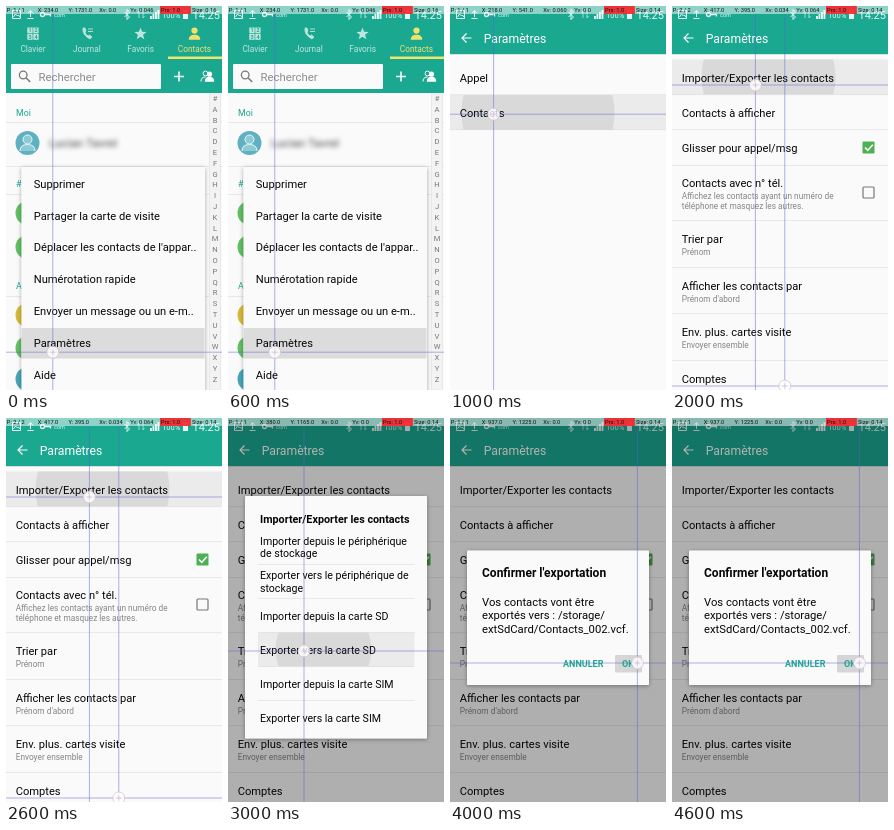
Animation of 216x384 px, one loop 5000 ms. Source, as an HTML page:

```html
<!DOCTYPE html>
<html lang="fr">
<head>
<meta charset="utf-8">
<title>Export des contacts</title>
<style>
html, body { margin: 0; width: 100%; height: 100%; overflow: hidden; background: #fafafa; }
svg { display: block; width: 100vw; height: 100vh; font-family: Roboto, "Noto Sans", sans-serif; }
</style>
</head>
<body>
<svg id="stage" viewBox="0 0 216 384"></svg>
<script>
const TEAL = '#1ba891', INK = '#060606', MUTED = '#858585', PAPER = '#fafafa';
const stage = document.getElementById('stage');

const rect = (x, y, w, h, fill, extra = '') =>
  `<rect x="${x}" y="${y}" width="${w}" height="${h}" fill="${fill}" ${extra}/>`;
const circle = (x, y, r, fill, extra = '') =>
  `<circle cx="${x}" cy="${y}" r="${r}" fill="${fill}" ${extra}/>`;
const path = (d, stroke = '#fff', width = 1, fill = 'none') =>
  `<path d="${d}" fill="${fill}" stroke="${stroke}" stroke-width="${width}"/>`;
const text = (x, y, value, size = 11.15, fill = INK, extra = '') =>
  `<text x="${x}" y="${y}" font-size="${size}" fill="${fill}" ${extra}>${value}</text>`;
const centered = 'text-anchor="middle"';
const bold = 'font-weight="700"';
const divider = (y, x = 0, width = 216) => rect(x, y, width, 0.6, '#dcdcdc');

// Touch ripple: a disc cut off by the row it spreads in.
function ripple(x, y, r, top, bottom, fill = '#d9d9d9') {
  const half = edge => Math.sqrt(r * r - (edge - y) ** 2);
  const a = half(top), b = half(bottom);
  return `<path fill="${fill}" d="M${x - a} ${top}H${x + a}A${r} ${r} 0 0 1 ${x + b} ${bottom}H${x - b}A${r} ${r} 0 0 1 ${x - a} ${top}Z"/>`;
}

function statusBar() {
  const bars = [0, 1, 2, 3].map(i => rect(144 + i * 2.5, 10 - i * 2, 1.9, 3 + i * 2, '#fff')).join('');
  return rect(0, 0, 216, 15, TEAL) + `<g opacity=".9">` +
    path('M6.5 4.5h8v8h-8zM7.5 11l2-3 2 2 1-1 1.5 2') +
    path('M24.5 11V5M22 7.5l2.5-3 2.5 3M21.5 12.5h6') +
    circle(36.5, 8.5, 2, 'none', 'stroke="#fff" stroke-width="1.3"') + path('M38.5 8.5h6v2', '#fff', 1.3) +
    text(48, 11, 'com', 5.5, '#fff') +
    path('M118.5 6l5 5-2.5 2.5V3.5l2.5 2.5-5 5') +
    path('M133 12V5m-1.5 2l1.5-2M137 5v7m1.5-2l-1.5 2', '#d6eee9', .8) +
    bars + text(156, 11.5, '100%', 7.5, '#fff') +
    rect(177, 4, 5, 9, '#fff') + text(186.5, 12.5, '14:25', 11, '#fff') + '</g>';
}

function header() {
  return rect(0, 0, 216, 48, TEAL) + statusBar() + rect(0, 48, 216, .7, '#c7d8d5') +
    path('M21.5 32h-9M16.5 27.5L12 32l4.5 4.5', '#fff', 1.2) +
    text(33.7, 36.5, 'Paramètres', 12.2, '#fff');
}

const person = (x, y, fill, s = 1) =>
  circle(x, y - 3 * s, 2.7 * s, fill) +
  `<path fill="${fill}" d="M${x - 5 * s} ${y + 5 * s}q0-5 ${5 * s}-5t${5 * s} 5z"/>`;

function contactsScreen() {
  const yellow = '#f0e36b', pale = '#bfe6de';
  let out = rect(0, 0, 216, 384, PAPER) + rect(0, 0, 216, 87, TEAL) + statusBar();
  for (let i = 0; i < 4; i++) {
    const x = 21.3 + (i % 2) * 6, y = 21.5 + (i > 1) * 6.5;
    out += rect(x, y, 5.3, 5.8, pale) + text(x + 2.65, y + 4.9, i + 1, 5.4, TEAL, centered + ' ' + bold);
  }
  out += path('M77 22q-1 7 7 11l2-2-2.5-2-1.5 1q-3-2-3-4l1-1-1-3z', pale, .8, pale) +
    path('M82 23h5M82 25.5h5', pale, .9);
  const star = Array.from({ length: 10 }, (_, i) => {
    const r = i % 2 ? 2.7 : 6.5, a = i * Math.PI / 5;
    return `${134.5 + r * Math.sin(a)},${28 - r * Math.cos(a)}`;
  }).join(' ');
  out += `<polygon points="${star}" fill="${pale}"/>` + person(188.5, 28, yellow, 1.15);
  ['Clavier', 'Journal', 'Favoris', 'Contacts'].forEach((tab, i) => {
    out += text(27 + i * 53.8, 45.5, tab, 8.3, i === 3 ? yellow : pale, centered);
  });
  out += rect(162, 50.5, 54, 2.5, '#eee66b') +
    rect(5, 58, 150, 25, PAPER, 'rx="1"') +
    circle(17.2, 69, 3.8, 'none', 'stroke="#777" stroke-width="1.3"') + path('M20.2 72l4 4', '#777', 1.5) +
    text(32.5, 74.5, 'Rechercher', 11.4, '#8c8c8c') +
    path('M168 70.5h10M173 65.5v10', '#fff', 1.5) +
    circle(199.5, 67.5, 2.4, 'none', 'stroke="#fff"') + path('M195 75.5q0-4.5 4.5-4.5') +
    person(203.5, 71, '#fff', .95);

  out += text(10, 110, 'Moi', 8.8, TEAL) + divider(116) +
    circle(21.5, 137, 12, '#5fb1c2') + circle(21.5, 133.5, 4.5, '#8ccad6', 'stroke="#e9f7fa"') +
    path('M14 145q0-6.5 7.5-6.5t7.5 6.5', '#e9f7fa', 1, '#8ccad6') +
    `<g style="filter:blur(2.5px)">${text(43, 141, 'Lucian Tavrel', 11.7, '#444')}</g>` +
    divider(160) + text(10, 181, '#', 9, TEAL) + divider(188) +
    text(10, 283, 'A', 9, TEAL) + divider(290);
  [[207, '#62bf63'], [241, '#62bf63'], [309, '#d8b93c'], [342, '#62bf63'], [373, '#47a5b8']]
    .forEach(([y, fill]) => { out += circle(21.5, y, 12, fill); });

  out += rect(203.5, 88, 11, 296, '#f3f3f3', 'stroke="#dfdfdf" stroke-width=".6"');
  [...'#ABCDEFGHIJKLMNOPQRSTUVWXYZ'].forEach((letter, i) => {
    out += text(209, 95 + i * 10.8, letter, 7.6, '#777', centered);
  });

  out += rect(15.5, 161, 183.5, 226, PAPER, 'filter="url(#shadow)"') + rect(15.5, 322, 183, 30.5, '#dcdcdc');
  ['Supprimer', 'Partager la carte de visite', "Déplacer les contacts de l'appar..", 'Numérotation rapide',
    'Envoyer un message ou un e-m..', 'Paramètres', 'Aide'].forEach((item, i) => {
    out += text(27.7, 181.8 + i * 31.8, item);
  });
  return out;
}

function settingsScreen() {
  return rect(0, 0, 216, 384, PAPER) + header() +
    rect(0, 89, 216, 35, '#ebebeb') + ripple(88, 106.5, 76.5, 89, 124) +
    divider(88.5) + divider(123.5) +
    text(9.7, 75.5, 'Appel') + text(9.7, 110.5, 'Contacts');
}

function contactSettings(pressed) {
  let out = rect(0, 0, 216, 384, PAPER) + header();
  if (pressed) out += rect(0, 53.5, 216, 35, '#ebebeb') + ripple(96.5, 71, 67, 53.5, 88.5);
  out += [88.5, 123.5, 159, 214.5, 261, 307.5, 354].map(y => divider(y)).join('');
  const rows = [
    [75.5, 'Importer/Exporter les contacts'],
    [110.5, 'Contacts à afficher'],
    [145.5, 'Glisser pour appel/msg'],
    [181, 'Contacts avec n° tél.', 'Affichez les contacts ayant un numéro de', 'téléphone et masquez les autres.'],
    [237, 'Trier par', 'Prénom'],
    [283.5, 'Afficher les contacts par', "Prénom d'abord"],
    [330, 'Env. plus. cartes visite', 'Envoyer ensemble'],
    [376.5, 'Comptes']
  ];
  rows.forEach(([y, title, ...notes]) => {
    out += text(9.7, y, title);
    notes.forEach((note, i) => { out += text(9.7, y + 12.3 + i * 9.8, note, 8.3, MUTED); });
  });
  return out + rect(190.5, 135.5, 12, 12, '#4db052', 'rx="1"') +
    path('M193 141.5l2.8 2.8 5-5.5', '#fff', 1.5) +
    rect(191, 181, 11, 11, 'none', 'rx="1" stroke="#777" stroke-width="1.2"');
}

const dialog = (y, h, body) => contactSettings(false) +
  rect(0, 0, 216, 384, '#000', 'opacity=".3"') +
  rect(17, y, 182, h, PAPER, 'rx="1" filter="url(#shadow)"') + body;

function exportDialog() {
  const lines = [
    [127, 'Importer depuis le périphérique'], [139, 'de stockage'],
    [161, 'Exporter vers le périphérique de'], [173.5, 'stockage'],
    [201.5, 'Importer depuis la carte SD'], [235.5, 'Exporter vers la carte SD'],
    [269.5, 'Importer depuis la carte SIM'], [303.5, 'Exporter vers la carte SIM']
  ];
  let out = rect(30, 214.5, 156.5, 34, '#ebebeb') + ripple(95.5, 231.5, 48, 214.5, 248.5);
  for (let i = 0; i < 5; i++) out += divider(146 + i * 34, 30, 156.5);
  return dialog(78, 242.5, out +
    text(32, 104.5, 'Importer/Exporter les contacts', 10.8, INK, bold) +
    lines.map(([y, line]) => text(32, y, line, 10.6)).join(''));
}

function confirmDialog() {
  const lines = ['Vos contacts vont être', 'exportés vers : /storage/', 'extSdCard/Contacts_002.vcf.'];
  return dialog(132.5, 134.5,
    text(32, 159, "Confirmer l'exportation", 12, INK, bold) +
    lines.map((line, i) => text(32, 187.5 + i * 13.8, line, 11.25)).join('') +
    rect(165, 237, 27, 17.5, '#d6d6d6', 'rx="1"') +
    text(113, 249.2, 'ANNULER', 9, TEAL, bold) + text(172, 249.2, 'OK', 9, TEAL, bold));
}

// Touch overlay; device pixels are five times the stage units.
function pointers(readout, points) {
  const cell = 216 / 7;
  let out = rect(0, 0, 216, 8, '#fff', 'opacity=".5"') + rect(154, 0, cell, 8, '#f5232b', 'opacity=".9"');
  readout.forEach((label, i) => { out += text(i * cell + .8, 6, label, 5.7, '#111'); });
  points.forEach(([px, py]) => {
    const x = px / 5, y = py / 5;
    out += `<g stroke="#5a64cf" stroke-width=".7" opacity=".7"><path d="M${x} 8V384M0 ${y}H216"/></g>` +
      circle(x, y, 6, '#fff', 'fill-opacity=".8" stroke="#d9c3cf" stroke-width=".8"') +
      `<path d="M${x - 2.5} ${y}h5M${x} ${y - 2.5}v5" stroke="#d3b6cf" stroke-width=".7"/>`;
  });
  return out;
}

const readout = (count, x, y, xv, yv, size) =>
  [`P: ${count} / ${count}`, `X: ${x}.0`, `Y: ${y}.0`, `Xv: ${xv}`, `Yv: ${yv}`, 'Prs: 1.0', `Size: ${size}`];

const scenes = [
  contactsScreen() + pointers(readout(1, 234, 1731, '0.0', '0.046', '0.16'), [[234, 1731]]),
  settingsScreen() + pointers(readout(1, 218, 541, '0.060', '0.0', '0.14'), [[218, 541]]),
  contactSettings(true) + pointers(readout(2, 417, 395, '0.034', '0.064', '0.14'), [[417, 395], [564, 1900]]),
  exportDialog() + pointers(readout(1, 380, 1165, '0.0', '0.0', '0.14'), [[380, 1165]]),
  confirmDialog() + pointers(readout(1, 937, 1225, '0.0', '0.0', '0.14'), [[937, 1225]])
];

stage.innerHTML = `<defs><filter id="shadow" x="-10%" y="-10%" width="120%" height="120%">
  <feDropShadow dx="0" dy="1" stdDeviation="2" flood-opacity=".35"/></filter></defs>` +
  scenes.map(scene => `<g display="none">${scene}</g>`).join('');
const groups = stage.querySelectorAll(':scope > g');

const start = performance.now();
function render(time) {
  const current = Math.floor(Math.max(0, time - start) % 5000 / 1000);
  groups.forEach((group, i) => group.setAttribute('display', i === current ? 'inline' : 'none'));
  requestAnimationFrame(render);
}
render(start);
</script>
</body>
</html>
```
